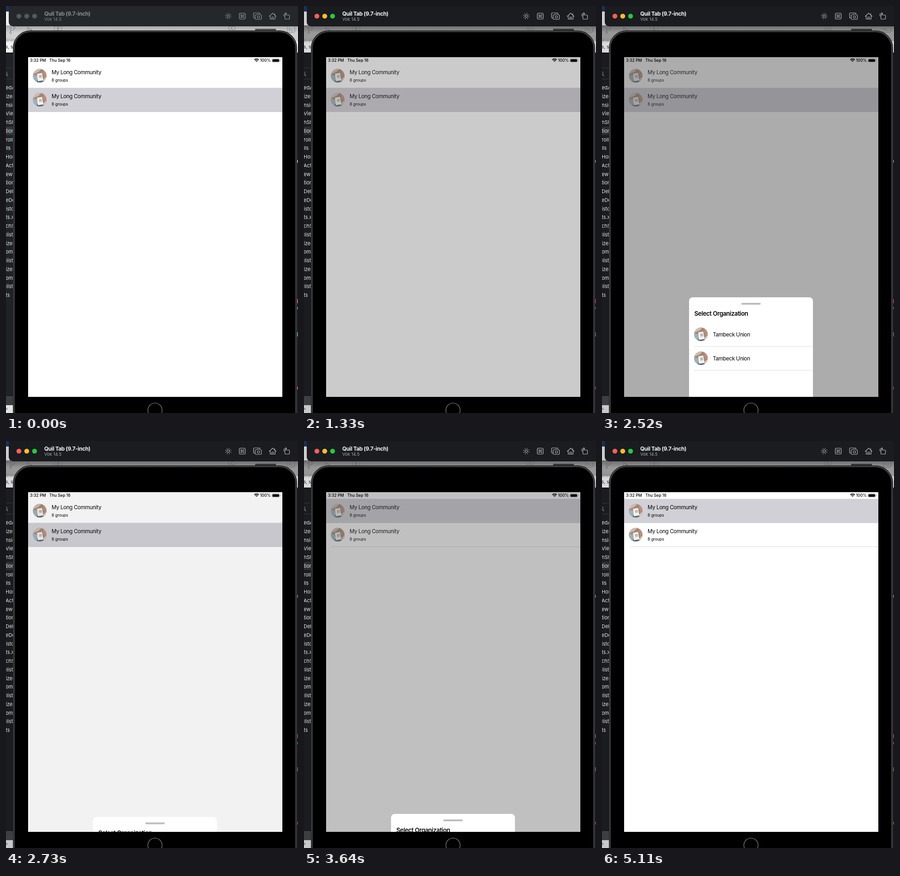
Recreate the animation shown at these times as an HTML page with a canvas. Size 634x883 px, loop 5670 ms.

```html
<!DOCTYPE html>
<html lang="en">
<head>
<meta charset="utf-8">
<title>Bottom sheet on a tablet</title>
<style>
  html, body { margin: 0; width: 100%; height: 100%; overflow: hidden; background: #1d1f22; }
  canvas { display: block; width: 634px; height: 883px; }
</style>
</head>
<body>
<canvas id="stage" width="634" height="883"></canvas>
<script>
const ctx = document.getElementById('stage').getContext('2d');
const LOOP = 5670, STEP = 70;
const SCREEN = { x: 48, y: 111, w: 552, h: 737 };
const BOTTOM = SCREEN.y + SCREEN.h;
const SHEET = { x: 189, w: 269, rest: 603, below: 1224 };
const MAX_DIM = 0.368, SETTLE = 480;
const ACTIVE_AT = 1120, FIRST_ROW_AT = 3430;
const VISITS = [{ show: 1199, hide: 2478 }, { show: 3476, hide: 4627 }];
const FILES = ('edAp izer nsid View nSha tion rolle lls Hom Acti ewCo tion Dele eDel isto ts.xc chSc ' +
  'plist izer omis plist izer omis plist ts').split(' ');

// Critically damped spring: 1 at the start, 0 when settled.
const spring = ms => (1 + 0.014 * ms) * Math.exp(-0.014 * ms);

function rect(x, y, w, h, fill) {
  ctx.fillStyle = fill;
  ctx.fillRect(x, y, w, h);
}

function round(x, y, w, h, r, fill, stroke, line = 1) {
  ctx.beginPath();
  ctx.roundRect(x, y, w, h, r);
  paint(fill, stroke, line);
}

function circle(x, y, r, fill, stroke, line = 1) {
  ctx.beginPath();
  ctx.arc(x, y, r, 0, Math.PI * 2);
  paint(fill, stroke, line);
}

function paint(fill, stroke, line) {
  if (fill) { ctx.fillStyle = fill; ctx.fill(); }
  if (stroke) { ctx.strokeStyle = stroke; ctx.lineWidth = line; ctx.stroke(); }
}

function path(d, stroke, line = 1.1, fill) {
  const p = new Path2D(d);
  if (fill) { ctx.fillStyle = fill; ctx.fill(p); }
  if (stroke) { ctx.strokeStyle = stroke; ctx.lineWidth = line; ctx.stroke(p); }
}

function at(x, y, draw) {
  ctx.save();
  ctx.translate(x, y);
  draw();
  ctx.restore();
}

function text(s, x, y, size, color, weight = 400, tracking = -0.03) {
  ctx.font = `${weight} ${size}px Inter, "Open Sans", sans-serif`;
  ctx.letterSpacing = `${tracking * size}px`;
  ctx.fillStyle = color;
  ctx.fillText(s, x, y);
}

function drawDesktop(active) {
  const light = active ? '#cdcdcd' : '#ececec';
  rect(0, 0, 634, 883, active ? '#1b1c1f' : '#202326');
  rect(0, 0, 634, 101, light);
  rect(0, 0, 8, 12, '#1c2f5c');
  rect(0, 80, 17, 21, active ? '#dadada' : '#f4f4f4');
  rect(0, 101, 17, 1.5, '#0c0d0e');
  rect(0, 134, 17, 1, '#34373a');
  rect(0, 158, 17, 1, '#34373a');

  const shade = ctx.createLinearGradient(0, 42, 0, 58);
  shade.addColorStop(0, active ? 'rgba(0,0,0,.48)' : 'rgba(0,0,0,.3)');
  shade.addColorStop(1, active ? 'rgba(0,0,0,.26)' : 'rgba(0,0,0,.12)');
  rect(0, 42, 634, 34, shade);

  const ink = active ? '#6a6a6a' : '#858585';
  circle(10, 47, 2, null, ink);
  circle(18, 47, 2, null, ink);
  circle(10, 58, 2, null, ink);
  path('M10 49V56M18 49Q18 53 10 53M47 45V54M47 46L55 54M55 49V54H50', ink);
  round(105, 44, 16, 12, 2, null, ink);
  circle(113, 48, 2.2, ink);
  path('M108 55Q113 49 118 55', ink);
  circle(486, 48, 3.5, null, ink);
  circle(494, 48, 4, null, ink);
  rect(541, 49.5, 45, 3.5, active ? '#303032' : '#4a4a4c');
  round(611, 43, 16, 14, 2, null, ink);
  path('M614 47L617 50L614 53M618 53H623', ink);

  text('Bran', -1, 76.5, 9.5, active ? '#888' : '#a0a0a0', 400, 0);
  text('s, sc', -1, 91.5, 10, '#242424', 400, 0);
  circle(-1, 146, 3.5, null, '#8b8d90');
  path('M1.5 149L4 152', '#8b8d90', 1.3);

  rect(0, 262, 17, 18, active ? '#2c2e32' : '#34373b');
  FILES.forEach((name, i) =>
    text(name, name === 'plist' ? -6 : -1, 181 + 18.75 * i, 11, '#e6e6e7', 400, 0));

  rect(0, 846, 17, 20, '#3c3f42');
  rect(0, 845, 17, 1, '#0e0f10');
  rect(0, 866, 17, 17, active ? '#c8c8c8' : '#e4e4e4');
  text('ns', -3, 876, 6, '#333');

  ctx.globalAlpha = active ? 0.6 : 1;
  [[334, 6, '#a5a7aa'], [636, 9, '#d6508c'], [653, 5, '#6f7fb0'],
   [708, 9, '#59a08c'], [826, 6, '#d6506c']].forEach(([y, h, c]) => rect(632, y, 2, h, c));
  ctx.globalAlpha = 1;
}

function drawTitleBar(active) {
  round(6, -10, 640, 54, 9, active ? '#1a1c20' : '#25282b');
  rect(14, 43.3, 620, 0.7, active ? '#0a0a0b' : '#141617');
  ['#fe5f57', '#febc2e', '#28c840'].forEach((c, i) =>
    circle(28 + 17 * i, 22, 5.3, active ? c : '#55585b'));
  text('Quil Tab (9.7-inch)', 83, 20.6, 11.8, active ? '#f4f4f5' : '#8a8d90', 700);
  text('Vok 14.5', 83, 32.4, 9.5, active ? '#a4a6a9' : '#808386', 400, 0);
  drawTools(active ? '#b2b4b7' : '#96999c');
}

function drawTools(ink) {
  ctx.lineCap = ctx.lineJoin = 'round';
  at(482.5, 22, () => {
    circle(0, 0, 2.7, null, ink, 1.1);
    for (let i = 0; i < 8; i++) {
      ctx.rotate(Math.PI / 4);
      path('M4.8 1.5L6.2 2', ink, 1.1);
    }
  });
  at(513, 22, () => {
    round(-6.5, -6.5, 13, 13, 2.2, null, ink, 1.2);
    ctx.strokeStyle = ink;
    ctx.lineWidth = 0.9;
    ctx.strokeRect(-1.4, -1.4, 2.8, 2.8);
    for (const x of [-2.6, 2.6]) for (const y of [-2.6, 2.6]) circle(x, y, 1.3, null, ink, 0.9);
  });
  at(546, 22, () => {
    path('M-5.5 4H-6.5Q-8.5 4 -8.5 2V-5Q-8.5 -7 -6.5 -7H4Q5.5 -7 5.5 -5.5', ink, 1.2);
    path('M-3.5 -3H-1L0 -4.5H4.5L5.5 -3H7Q8.5 -3 8.5 -1.5V5.5Q8.5 7 7 7H-3.5Q-5 7 -5 5.5V-1.5Q-5 -3 -3.5 -3Z', ink, 1.2);
    circle(2, 1.8, 2.5, null, ink, 1.1);
  });
  path('M571.5 22.5L579 15.5L586.5 22.5M573.7 21V28.5H584.3V21M577.3 28V24H580.7V28M583.5 19V16.5', ink, 1.2);
  round(605.5, 19.5, 10, 9, 1.6, null, ink, 1.2);
  path('M603.5 22V19Q603.5 16.5 606 16.5H609M607 14.3L609.3 16.5L607 18.7', ink, 1.2);
  ctx.lineCap = 'butt';
  ctx.lineJoin = 'miter';
}

function drawDevice() {
  round(16, 54, 615, 900, 37, '#0c0c0d', '#27282a', 2);
  round(17.7, 55.7, 611.6, 900, 35.5, '#000', '#525355', 1.6);
  round(20, 58, 607, 900, 33, '#000');
  circle(323.5, 877, 15.5, null, '#858587', 1.2);
}

function drawAvatar(x, y) {
  ctx.save();
  circle(x, y, 14.7, '#a58674');
  ctx.clip();
  ctx.translate(x, y);
  path('M-15 -15H4L-3 -8L-15 -3Z', null, 0, '#cbbcb2');
  path('M-15 -3L-4 1L-3 15H-15Z', null, 0, '#9db2ba');
  path('M8 -15H15V8L7 -4Z', null, 0, '#b9917c');
  path('M-6 9L13 12V15H-6Z', null, 0, '#56707c');
  path('M-6 -4L5 -6L8 10L-4 12Z', null, 0, '#f3f1ee');
  path('M-2 -1L4 -2L5 4L-1 5Z', null, 0, '#bfbab5');
  path('M8 11L13 4', '#eceae6', 1.6);
  ctx.restore();
}

function drawList(selected) {
  rect(SCREEN.x, SCREEN.y, SCREEN.w, SCREEN.h, '#fff');
  for (let i = 0; i < 2; i++) {
    const y = 125.5 + 52 * i;
    if (i === selected) rect(SCREEN.x, y, SCREEN.w, 52.5, '#d2d0d7');
    drawAvatar(73.2, y + 25.8);
    text('My Long Community', 99, y + 22.5, 11.6, '#000');
    text('8 groups', 99, y + 38.3, 8.7, '#000', 400, -0.01);
  }
  if (selected === 0) rect(59, 229, 541, 1, '#dcdcde');
}

function drawStatus() {
  text('3:32 PM', 52, 121.3, 8.7, '#000', 500, 0);
  text('Thu Sep 16', 94, 121.3, 8.7, '#000', 500, 0);
  text('100%', 551.5, 121.3, 8.7, '#000', 500, 0);
  for (const r of [2.7, 5.2, 7.7]) {
    ctx.beginPath();
    ctx.arc(544, 121.6, r - 0.7, -Math.PI * 0.75, -Math.PI * 0.25);
    paint(null, '#000', 1.5);
  }
  round(577.4, 114.4, 16.6, 7.6, 2.4, null, '#8b8b8b', 0.7);
  round(578.5, 115.4, 14.4, 5.6, 1.5, '#000');
  rect(594.9, 117, 0.8, 2.4, '#777');
}

function drawSheet(top) {
  const { x, w } = SHEET;
  round(x, top, w, BOTTOM - top + 10, [8, 8, 0, 0], '#fff');
  round(302.5, top + 12, 42, 4, 2, '#bdbdbf');
  text('Select Organization', 200.5, top + 39.7, 13.1, '#000', 600);
  for (let i = 0; i < 2; i++) {
    const y = top + 80.3 + 52 * i;
    drawAvatar(214.8, y);
    text('Tambeck Union', 240.5, y + 4.3, 11.6, '#000');
    rect(200, Math.round(y + 25.5), 258, 1, '#dfdfe1');
  }
}

function sheetAt(t) {
  for (const { show, hide } of VISITS) {
    if (t < show || t > hide + SETTLE) continue;
    if (t < hide) {
      const x = spring(t - show);
      return { top: SHEET.rest + (SHEET.below - SHEET.rest) * x, dim: MAX_DIM * (1 - x) };
    }
    const x = spring(t - hide);
    return { top: BOTTOM - (BOTTOM - SHEET.rest) * x, dim: MAX_DIM * x };
  }
  return null;
}

function render(t) {
  const active = t >= ACTIVE_AT;
  const sheet = sheetAt(t);
  drawDesktop(active);
  drawDevice();
  drawTitleBar(active);

  ctx.save();
  ctx.beginPath();
  ctx.rect(SCREEN.x, SCREEN.y, SCREEN.w, SCREEN.h);
  ctx.clip();
  drawList(t >= FIRST_ROW_AT ? 0 : 1);
  if (sheet) {
    rect(SCREEN.x, SCREEN.y, SCREEN.w, SCREEN.h, `rgba(85,85,85,${sheet.dim * 1.5})`);
    if (sheet.top < BOTTOM) drawSheet(sheet.top);
  }
  drawStatus();
  ctx.restore();
}

const start = performance.now();
function tick() {
  const t = (performance.now() - start) % LOOP;
  render(Math.floor(t / STEP) * STEP);
  requestAnimationFrame(tick);
}
tick();
</script>
</body>
</html>
```
